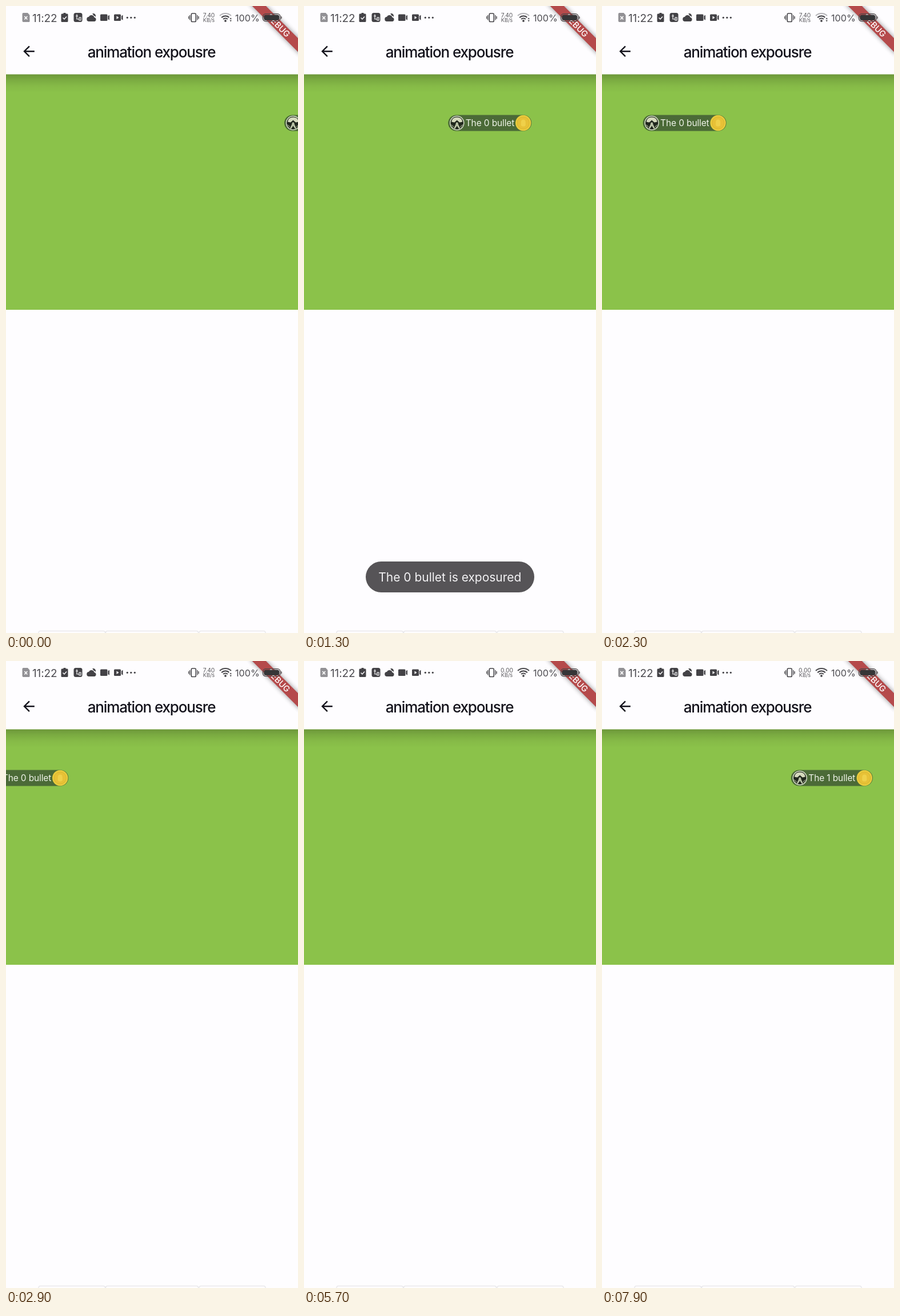
Animation of 511 by 1096 pixels, one loop 8000 ms. Source, as an HTML page:

```html
<!DOCTYPE html>
<html lang="en">
<head>
<meta charset="utf-8">
<title>animation expousre</title>
<style>
  html, body { margin: 0; width: 100%; height: 100%; overflow: hidden; background: #fefdff; }
  svg { display: block; width: 511px; height: 1096px; font-family: Inter, Roboto, sans-serif; }
</style>
</head>
<body>
<svg viewBox="0 0 511 1096" xmlns="http://www.w3.org/2000/svg">
  <defs>
    <linearGradient id="shade" x1="0" y1="0" x2="0" y2="1">
      <stop offset="0" stop-color="#000" stop-opacity=".22"/>
      <stop offset=".3" stop-color="#000" stop-opacity=".12"/>
      <stop offset=".65" stop-color="#000" stop-opacity=".04"/>
      <stop offset="1" stop-color="#000" stop-opacity="0"/>
    </linearGradient>
    <filter id="blur" x="-30%" y="-100%" width="160%" height="300%">
      <feGaussianBlur stdDeviation="4"/>
    </filter>
    <clipPath id="face"><circle cx="15.5" cy="14" r="11"/></clipPath>
  </defs>

  <rect width="511" height="1096" fill="#fefdff"/>
  <rect y="119.500" width="511" height="411.500" fill="#8bc24a"/>
  <rect y="119.500" width="511" height="32" fill="url(#shade)"/>

  <!-- app bar -->
  <path transform="translate(25.4 64.6) scale(1.22)" fill="#14131c"
    d="M20 11H7.83l5.59-5.59L12 4l-8 8 8 8 1.41-1.41L7.83 13H20z"/>
  <text x="254.5" y="89.600" font-size="26" font-weight="500" letter-spacing="-1.13" text-anchor="middle" fill="#14131c">animation expousre</text>

  <!-- bottom tabs -->
  <g fill="none" stroke="#e9e8eb" stroke-width="1.4">
    <rect x="57" y="1092.5" width="116.5" height="30" rx="3"/>
    <rect x="174.5" y="1092.5" width="162" height="30" rx="3"/>
    <rect x="338" y="1092.5" width="116" height="30" rx="3"/>
  </g>

  <!-- bullet -->
  <g id="bullet">
    <rect id="pill" height="28" rx="14" fill="#4b6a37"/>
    <circle cx="15.5" cy="14" r="12" fill="#20271d" stroke="#dbe5cd" stroke-width="1.5"/>
    <g clip-path="url(#face)">
      <path d="M6 12Q7 4 15.5 4T25 12L20 13 15.500 9 11 13Z" fill="#d5dabd"/>
      <path d="M14 13h3l1 4 4 8h-2.500l-4-6-4 6H9l4-8Z" fill="#b9c2a5"/>
      <path d="M5 17l4 3-2 4M26 17l-4 3 2 4" fill="none" stroke="#8f9a7c" stroke-width="1.300"/>
    </g>
    <text id="label" x="30.500" y="19.700" font-size="15.5" letter-spacing="-.13" fill="#eef3e8"></text>
    <g id="coin">
      <circle cy="14" r="13.700" fill="#e9cb3c"/>
      <circle cy="14" r="10.600" fill="#e7c137" stroke="#d9b02e" stroke-width=".8"/>
      <path d="M-4 18v-5q0-5 4-5t4 5v5l-2 2h-4Z" fill="#efd04a"/>
    </g>
  </g>

  <!-- debug ribbon -->
  <g transform="translate(511 0) rotate(45)">
    <rect x="-62" y="39.700" width="124" height="17" fill="#000" opacity=".45" filter="url(#blur)"/>
    <rect x="-62" y="39.700" width="124" height="17" fill="#b54a4b"/>
    <text y="53.400" font-size="14.500" font-weight="500" text-anchor="middle" fill="#fff">DEBUG</text>
  </g>

  <!-- status bar, left -->
  <path d="M30.500 12h7.500l3.500 4v10.500q0 1.500-1.500 1.500h-9.500q-2 0-2-2V14q0-2 2-2Z" fill="#929195"/>
  <path d="M32.300 18l5 5.500m0-5.500l-5 5.500" stroke="#fff" stroke-width="1.600"/>
  <text x="46" y="27.500" font-size="19" letter-spacing="-.15" fill="#4c4b50">11:22</text>
  <g fill="#434246">
    <path d="M98 13.500h2.500V12h4v1.500h2.500q1.500 0 1.500 1.500v11.500q0 1.500-1.500 1.500h-9q-1.500 0-1.500-1.500V15q0-1.500 1.500-1.500Z"/>
    <rect x="118.500" y="12" width="15" height="16" rx="3.500"/>
    <path d="M145.500 27a4 4 0 0 1-.5-8 5 5 0 0 1 9.500 1 3.600 3.600 0 0 1 .5 7Z"/>
    <path d="M151 13.500a4.500 4.500 0 0 1 6 5.500q-2-2-3.500-2.200-1-2-2.500-3.300Z"/>
    <rect x="165" y="14.500" width="12.500" height="11.500" rx="1.500"/>
    <path d="M178.500 17.500l2.500-1.700v9l-2.500-1.700Z"/>
    <rect x="189" y="14.500" width="12" height="11.500" rx="1.500"/>
    <path d="M202 17.500l2.500-1.700v9l-2.500-1.700Z"/>
    <circle cx="212.300" cy="20.300" r="1.600"/>
    <circle cx="218.800" cy="20.300" r="1.600"/>
    <circle cx="225.300" cy="20.300" r="1.600"/>
  </g>
  <g fill="none" stroke="#fefdff" stroke-width="1.400">
    <path d="M99.500 20.500l2.500 2.500 4-4.500"/>
    <path d="M124 14.500v8.500h4M122 17.500h4M128 20h3v5h-3Z" stroke-width="1.200"/>
    <path d="M193.500 17.500v5.500l4-2.750Z" fill="#fefdff" stroke="none"/>
  </g>

  <!-- status bar, right -->
  <g fill="none" stroke="#434246" stroke-width="1.600">
    <rect x="324.300" y="13" width="8" height="14.500" rx="1.800"/>
    <path d="M321.700 16v8.500M319.600 18v4.500M335 16v8.500M337.100 18v4.500" stroke-width="1.300"/>
  </g>
  <g fill="#59585c" text-anchor="middle">
    <text id="rate" x="355" y="19.700" font-size="10.300"></text>
    <text x="355" y="27.500" font-size="9.200">KB/s</text>
  </g>
  <g id="wifi" fill="none" stroke="#4a494d" stroke-width="2.100"></g>
  <circle cx="384" cy="26" r="1.900" fill="#4a494d"/>
  <g id="traffic">
    <rect x="390.500" y="19" width="6" height="10" fill="#fefdff"/>
    <path d="M391.500 23l1.700-2.800 1.700 2.800ZM391.500 24.800l1.700 2.800 1.700-2.800Z" fill="#4a494d"/>
  </g>
  <text x="401" y="26.900" font-size="16.200" fill="#4c4b50">100%</text>
  <rect x="449.500" y="13.700" width="30.500" height="13" rx="5" fill="none" stroke="#4d4648" stroke-width="1.300"/>
  <rect x="451.300" y="15.500" width="27" height="9.400" rx="3.500" fill="#353537"/>
  <path d="M481.300 17.500q1.500.5 1.500 2.700t-1.500 2.700Z" fill="#4d4648"/>

  <!-- toast -->
  <g id="toast">
    <rect x="108" y="971" width="295" height="54" rx="27" fill="#565457"/>
    <text x="255.300" y="1006" font-size="21" letter-spacing="-.03" text-anchor="middle" fill="#f3f2f4">The 0 bullet is exposured</text>
  </g>
</svg>
<script>
const LOOP = 8000, STEP = 100;
const SPEED = 0.1806;
const $ = id => document.getElementById(id);
const clamp = v => Math.max(0, Math.min(1, v));
const within = (t, a, b) => t >= a && t < b;

const arc = r => {
  const k = r * 0.7;
  return `<path d="M${384 - k} ${27 - k}A${r} ${r} 0 0 1 ${384 + k} ${27 - k}"/>`;
};
$("wifi").innerHTML = [14.2, 9.8, 5.6].map(arc).join("");
const outerArc = $("wifi").firstChild;

function showBullet(n, x, width) {
  $("bullet").setAttribute("transform", `translate(${x} 190.500)`);
  $("pill").setAttribute("width", width);
  $("coin").setAttribute("transform", `translate(${width - 14.5})`);
  $("label").textContent = `The ${n} bullet`;
}

function draw(ms) {
  const t = Math.floor(ms / STEP) * STEP;

  if (t < 4000) showBullet(0, 487 - SPEED * t, 146);
  else showBullet(1, 330.8 + 0.18 * (LOOP - STEP - t), 143);

  $("toast").setAttribute("opacity", Math.min(clamp((t - 900) / 200), clamp((2200 - t) / 200)));

  $("rate").textContent = t < 3000 ? "7.40" : t < 5400 ? "2.30" : "0.00";
  $("traffic").setAttribute("visibility", t < 3000 ? "visible" : "hidden");
  const weak = t < 500 || within(t, 1300, 2500) || within(t, 4600, 5700);
  outerArc.setAttribute("stroke", weak ? "#b3b2b6" : "#4a494d");
}

const start = performance.now();
function tick() {
  draw((performance.now() - start) % LOOP);
  requestAnimationFrame(tick);
}
tick();
</script>
</body>
</html>
```
